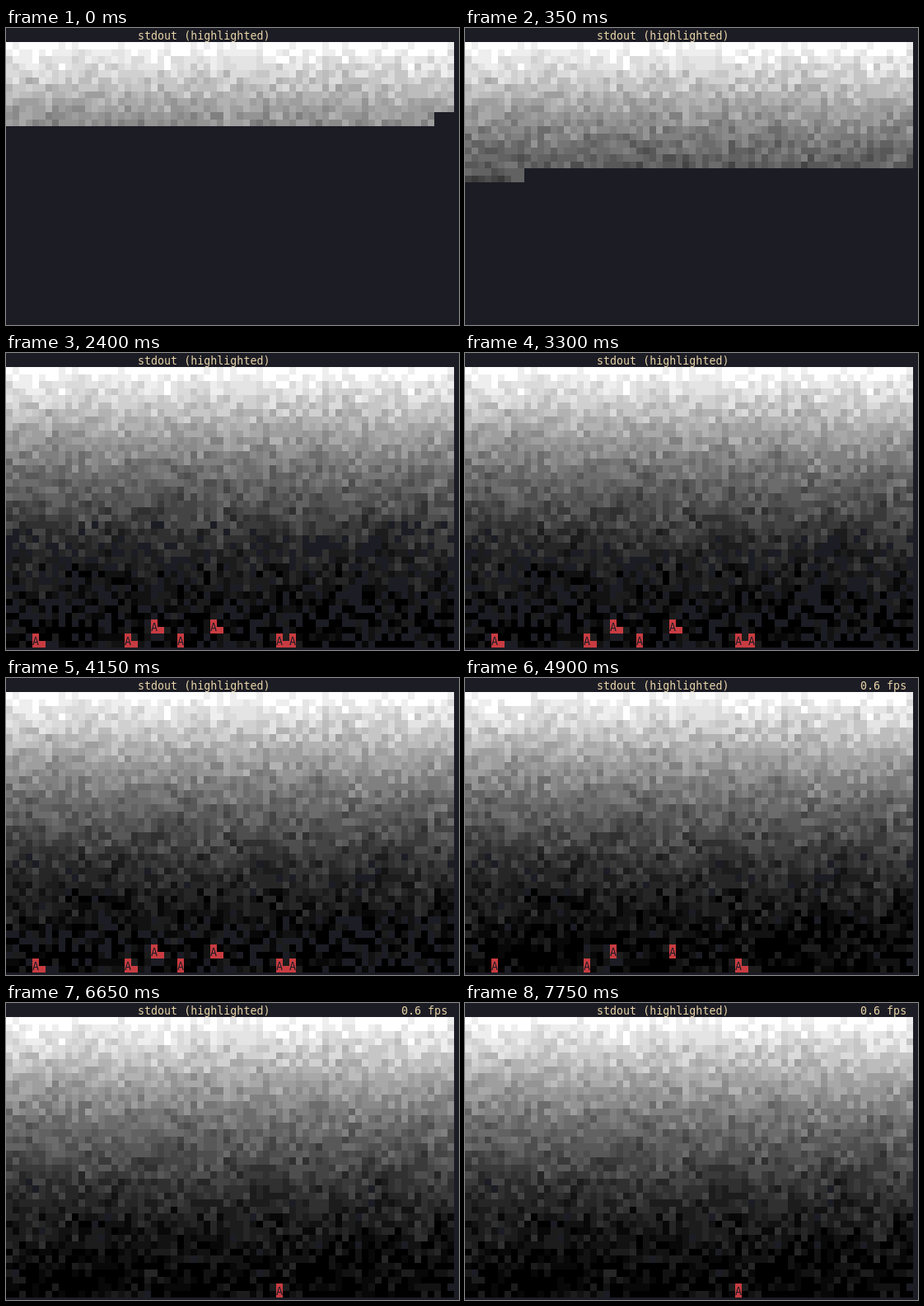
Write an HTML page with a canvas that moves like this. It is 550 by 360 pixels and loops after 8000 ms.

```html
<!DOCTYPE html>
<html lang="en">
<head>
<meta charset="utf-8">
<title>Terminal gradient</title>
<style>
  html, body { margin: 0; width: 100%; height: 100%; overflow: hidden; background: #1c1c25; }
  canvas { display: block; }
</style>
</head>
<body>
<canvas id="stage" width="550" height="360"></canvas>
<script>
const ctx = document.getElementById('stage').getContext('2d');
const COLS = 68, ROWS = 20, CELLS = COLS * ROWS;
const CELL_W = 8, CELL_H = 17, TOP_H = 9, BASELINE = 14;
const LOOP = 8000, TICK = 50, PASS_TIME = 2475, FIRST_START = -775, CHUNKS = 6;
const BG = '#1c1c25', RED = '#c83c41', TITLE = '#e8d5a8';

// Warning cells: column, row, number of passes they survive.
const warnings = [
  [4, 19, 2], [18, 19, 2], [22, 18, 2], [26, 19, 1], [31, 18, 2], [41, 19, 4], [43, 19, 1]
];

// Output arrives in six chunks per pass, each a little slower than the one before.
const chunkTime = (pass, chunk) => {
  const time = FIRST_START + pass * PASS_TIME + 339 * chunk + 11.5 * chunk * chunk;
  return Math.round(time / TICK) * TICK;
};
const cellsWritten = (pass, chunk) =>
  Math.floor(193 * chunk + 4.75 * chunk * chunk + 18 * pass);

function progressAt(time) {
  let pass = 0, chunk = 0;
  while (chunkTime(pass + 1, 0) <= time) pass++;
  while (chunk + 1 < CHUNKS && chunkTime(pass, chunk + 1) <= time) chunk++;
  return { pass, written: cellsWritten(pass, chunk) };
}

function random(x, y, seed) {
  let h = Math.imul(x + 1, 374761393) ^ Math.imul(y + 1, 668265263) ^ Math.imul(seed + 1, 1274126177);
  h = Math.imul(h ^ (h >>> 13), 1274126177);
  h = Math.imul(h ^ (h >>> 16), 2246822519);
  return ((h ^ (h >>> 15)) >>> 0) / 4294967296;
}

function shade(x, y, pass) {
  // Later passes fill most of the cells left empty near the bottom.
  const gaps = Math.min(0.28, Math.max(0, (y - 21) * 0.06));
  if (random(x, y, 1) < gaps / (1 + 7 * pass)) return BG;

  const base = 4 + 250 * Math.pow(1 - y / 39, 1.8);
  const grain = random(x, y, 2) + random(x, y, 3) - 1;
  const drift = random(x, y, 10 + pass) - 0.5;
  const value = base + grain * 30 + drift * 8 + 3 * Math.sin(x * 0.33 + y * 0.2);

  // Terminal greys come in steps of ten between black and white.
  if (value > 246) return '#fff';
  if (value < 6) return '#000';
  const level = Math.min(238, Math.max(8, 8 + 10 * Math.round((value - 8) / 10)));
  return `rgb(${level},${level},${level})`;
}

function fill(color, x, y, height) {
  ctx.fillStyle = color;
  ctx.fillRect(x, y, CELL_W, height);
}

function text(value, col, row, color) {
  ctx.fillStyle = color;
  ctx.fillText(value, col * CELL_W, row * CELL_H + BASELINE);
}

function drawCell(col, row, pass) {
  const x = col * CELL_W, y = (row + 1) * CELL_H;
  if (warnings.some(([c, r, life]) => c === col && r === row && pass < life)) {
    fill(RED, x, y, CELL_H);
    text('A', col, row + 1, BG);
    return;
  }
  // A half-block tail follows a warning for the first part of its life.
  const tail = warnings.some(([c, r, life]) => c + 1 === col && r === row && pass * 2 < life - 1);
  fill(shade(col, row * 2, pass), x, y, TOP_H);
  fill(tail ? RED : shade(col, row * 2 + 1, pass), x, y + TOP_H, CELL_H - TOP_H);
}

function draw({ pass, written }) {
  ctx.fillStyle = BG;
  ctx.fillRect(0, 0, 550, 360);
  ctx.font = '13.33px "DejaVu Sans Mono", monospace';
  text('stdout (highlighted)', 20, 0, TITLE);
  if (pass >= 2) text('0.6 fps', 60, 0, TITLE);
  for (let i = 0; i < CELLS; i++) {
    const cellPass = i < written ? pass : pass - 1;
    if (cellPass >= 0) drawCell(i % COLS, Math.floor(i / COLS), cellPass);
  }
}

let shown = '';
const start = performance.now();
function tick() {
  const progress = progressAt((performance.now() - start) % LOOP);
  const key = `${progress.pass}:${progress.written}`;
  if (key !== shown) draw(progress);
  shown = key;
  requestAnimationFrame(tick);
}
tick();
</script>
</body>
</html>
```
